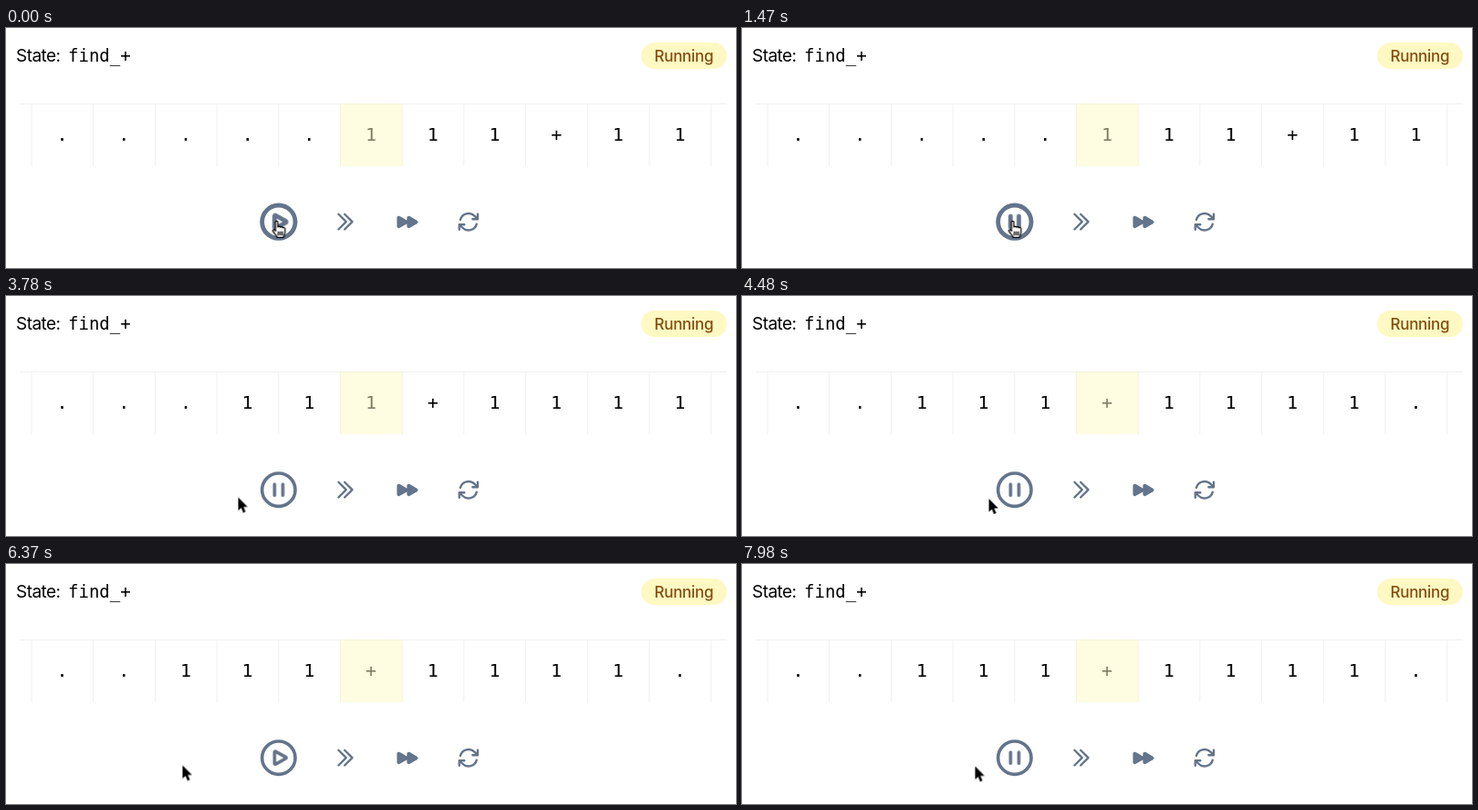
Animation, 800 px wide and 264 px high, one loop 8 s. Source, as an HTML page:

```html
<!DOCTYPE html>
<html lang="en">
<head>
<meta charset="utf-8">
<title>Turing machine</title>
<style>
  html, body { margin: 0; width: 100%; height: 100%; overflow: hidden; background: #fff; }
  svg { display: block; width: 800px; height: 264px; }
  .sans { font-family: Inter, sans-serif; }
  .mono { font-family: "DejaVu Sans Mono", monospace; }
  .icon { fill: none; stroke: #64748b; stroke-width: 2.1; stroke-linecap: round; stroke-linejoin: round; }
  .solid { fill: #64748b; stroke: none; }
  .cells { font-size: 20px; text-anchor: middle; }
  .cells line { stroke: #f0f0f2; }

  .cells, .toggle, .play, .pause, .cursor, .hand, .arrow, .ripple { animation: 8s infinite both; }
  .cells { animation-name: step; }
  .cursor { animation-name: travel; animation-timing-function: ease-in-out; }
  .toggle { animation-name: hover; }
  .play { animation-name: play; }
  .pause { animation-name: pause; }
  .hand { animation-name: hand; }
  .arrow { animation-name: arrow; }
  .toggle, .play, .pause, .hand, .arrow { animation-timing-function: step-end; }
  .ripple {
    fill: none; stroke: #8fbaf6; stroke-width: 2;
    animation-name: ripple; animation-timing-function: ease-out;
    animation-delay: calc(var(--at) - 8s);
  }

  @keyframes step {
    0%, 26.4% { transform: translateX(0); }
    29.5%, 39.75% { transform: translateX(-67.7px); }
    42.9%, 52.9% { transform: translateX(-135.4px); }
    56%, 100% { transform: translateX(-203.1px); }
  }
  @keyframes travel {
    0%, 25.4% { transform: translate(296.5px, 212px); }
    29.75%, 49% { transform: translate(254.5px, 221.5px); }
    50.75%, 52.9% { transform: translate(256px, 223.5px); }
    56% { transform: translate(270.5px, 223px); }
    59.5%, 66.25% { transform: translate(300.3px, 217px); }
    70%, 83.5% { transform: translate(193.5px, 221.5px); }
    91.9%, 96.75% { transform: translate(297px, 214px); }
    99.4%, 100% { transform: translate(255.5px, 222.5px); }
  }
  @keyframes hover {
    0%, 57.5%, 90.4% { stroke-width: 2.4; }
    26.5%, 67.5%, 98.1%, 100% { stroke-width: 1.8; }
  }
  @keyframes hand {
    0%, 57.5%, 90.4% { opacity: 1; }
    26.5%, 67.5%, 98.1%, 100% { opacity: 0; }
  }
  @keyframes arrow {
    0%, 57.5%, 90.4% { opacity: 0; }
    26.5%, 67.5%, 98.1%, 100% { opacity: 1; }
  }
  @keyframes play {
    0%, 63.4% { opacity: 1; }
    12.5%, 95.4%, 100% { opacity: 0; }
  }
  @keyframes pause {
    0%, 63.4% { opacity: 0; }
    12.5%, 95.4%, 100% { opacity: 1; }
  }
  @keyframes ripple {
    0% { r: 22px; opacity: 1; }
    2.2% { opacity: 1; animation-timing-function: linear; }
    4.5% { r: 37px; opacity: 0; }
    100% { r: 37px; opacity: 0; }
  }
</style>
</head>
<body>
<svg viewBox="0 0 800 264">
  <defs><clipPath id="window"><rect x="15" y="83" width="775" height="69"/></clipPath></defs>

  <text class="sans" x="11" y="37" font-size="19" letter-spacing="-.55">State:</text>
  <text class="mono" x="68" y="37" font-size="19">find_+</text>
  <rect x="696" y="16" width="94" height="29" rx="14.5" fill="#fef9c3"/>
  <text class="sans" x="710.5" y="37" font-size="17" font-weight="500" letter-spacing="-.3" fill="#854d0e">Running</text>

  <g clip-path="url(#window)"><g class="cells mono" id="cells"></g></g>
  <path d="M15 83.5H790" stroke="#f0f0f2"/>
  <rect x="366.3" y="83" width="68.2" height="69" fill="#fef9c3" fill-opacity=".5"/>

  <g class="icon">
    <g class="toggle" transform="translate(298.8 213.2) scale(2.02) translate(-12 -12)">
      <circle cx="12" cy="12" r="9"/>
      <path class="play" d="M15.91 11.672a.375.375 0 0 1 0 .656l-5.603 3.113a.375.375 0 0 1-.557-.328V8.887c0-.286.307-.466.557-.327Z"/>
      <path class="pause" d="M14.25 9v6m-4.5 0V9"/>
    </g>
    <path transform="translate(358.5 199.7) scale(1.12)" d="m5.25 4.5 7.5 7.5-7.5 7.5m6-15 7.5 7.5-7.5 7.5"/>
    <path class="solid" transform="translate(425.9 199.2) scale(1.12)" d="M5.055 7.06C3.805 6.347 2.25 7.25 2.25 8.69v8.122c0 1.44 1.555 2.343 2.805 1.628L12 14.471v2.34c0 1.44 1.555 2.343 2.805 1.628l7.108-4.061c1.26-.72 1.26-2.536 0-3.256l-7.108-4.061C13.555 6.346 12 7.249 12 8.689v2.34Z"/>
    <path transform="translate(493.4 199.8) scale(1.12)" d="M16.023 9.348h4.992M2.985 19.644v-4.992h4.992m-4.993 0 3.181 3.183a8.25 8.25 0 0 0 13.803-3.7M4.031 9.865a8.25 8.25 0 0 1 13.803-3.7l3.181 3.182m0-4.991v4.99"/>
  </g>

  <circle class="ripple" cx="298" cy="213" r="22" style="--at:.88s"/>
  <circle class="ripple" cx="302" cy="217.5" r="22" style="--at:4.97s"/>
  <circle class="ripple" cx="298.5" cy="214" r="22" style="--at:7.53s"/>

  <g class="cursor">
    <path class="arrow" d="M0 0V14.6L3.3 11.5 5.5 16.9 8 15.8 5.8 10.6H10.3Z" stroke="#fff" stroke-width="1.6" paint-order="stroke"/>
    <g class="hand" fill="#fff" stroke="#000" stroke-width="1.2" stroke-linejoin="round" stroke-linecap="round">
      <path transform="translate(-5 0) scale(1.06)" d="M3.5 1.6c0-1.6 2.6-1.6 2.6 0v5c.3-1.1 2.4-1.1 2.6.2.5-.9 2.3-.7 2.5.6.6-.8 2.3-.5 2.3 1v3.4c0 2.4-1.5 3.2-1.5 5.4H5.4c-.3-1.8-2.6-3.6-4.2-6-.9-1.4.6-2.6 1.7-1.5l.8.9ZM6.5 11.5v3.2M8.6 11.5v3.2M10.7 11.5v3.2"/>
    </g>
  </g>
</svg>
<script>
  const cellWidth = 67.7;
  const tape = "......111+1111..";
  const cells = document.getElementById("cells");

  function add(name, attrs, text = "") {
    const node = document.createElementNS("http://www.w3.org/2000/svg", name);
    for (const key in attrs) node.setAttribute(key, attrs[key]);
    node.textContent = text;
    cells.append(node);
  }

  // The first symbol sits just left of the visible window.
  [...tape].forEach((symbol, i) => {
    const left = 28 + (i - 1) * cellWidth;
    add("line", { x1: left, x2: left, y1: 83, y2: 152 });
    add("text", { x: left + cellWidth / 2 - .3, y: 124 }, symbol);
  });
</script>
</body>
</html>
```
